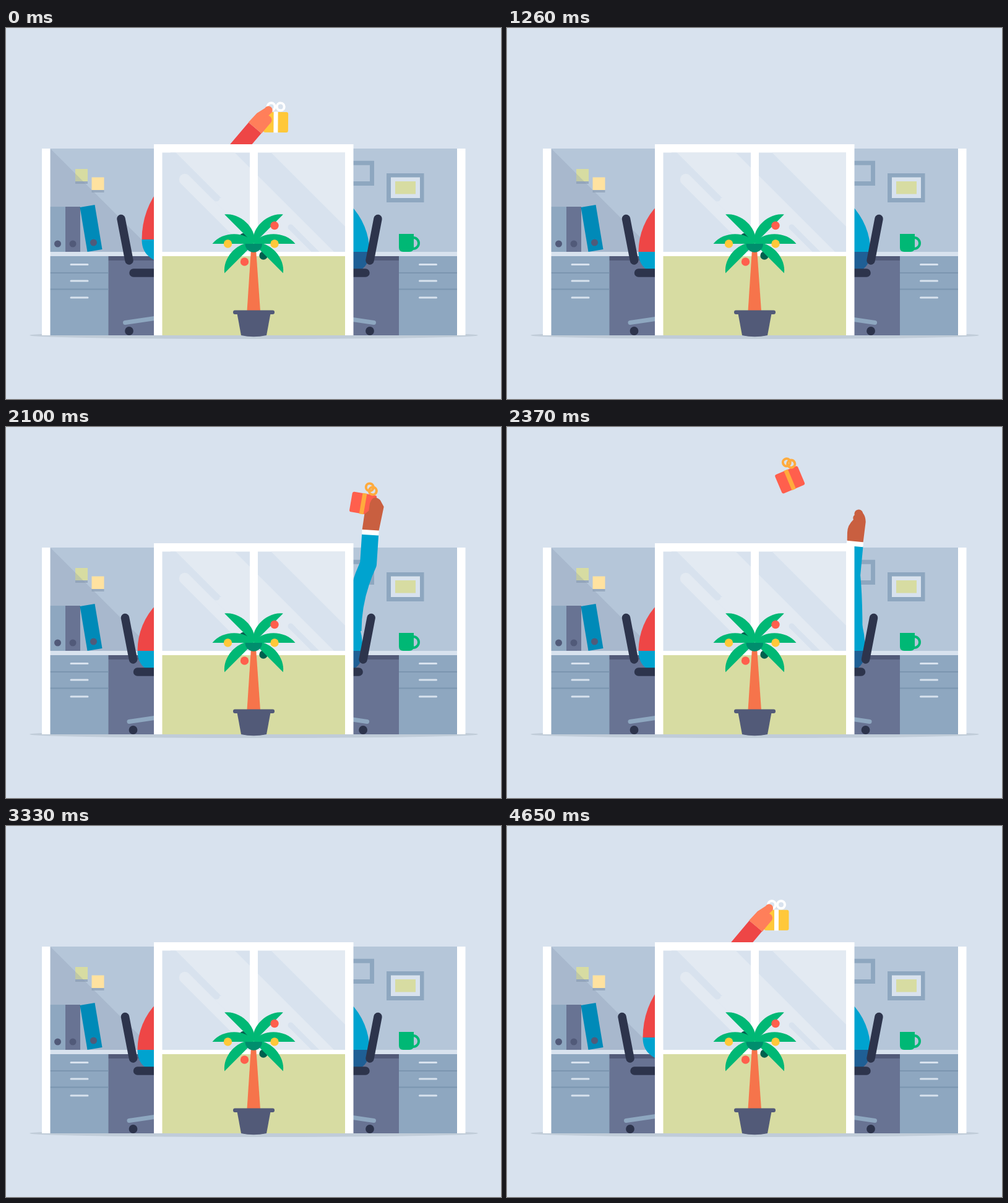
An HTML page that plays this animation: 800x600 px, repeating every 4.68 s.

```html
<!DOCTYPE html>
<html lang="en">
<head>
<meta charset="utf-8">
<title>Office gift exchange</title>
<style>
  html, body { margin: 0; width: 100%; height: 100%; overflow: hidden; background: #d8e2ee; }
  svg { display: block; width: 100vw; height: 100vh; }
</style>
</head>
<body>
<svg viewBox="0 0 800 600">
  <defs>
    <g id="desk">
      <path fill="#687393" d="M165 369h76v128h-76z"/>
      <path fill="#525a78" d="M165 369h76v7h-76z"/>
      <path fill="#d8e2ee" d="M71 362h170v7h-170z"/>
      <path fill="#8ea7c0" d="M71 369h94.500v128h-94.500z"/>
      <path stroke="#7b95b0" stroke-width="2" d="M71 396h94.500M71 422.500h94.500"/>
      <path stroke="#d8e2ee" stroke-width="3" stroke-linecap="round" d="M105 382.500h27M105 409h27M105 436h27"/>
      <path fill="#fff" d="M58 195h13.500v302h-13.500z"/>
    </g>
    <g id="chair" fill="none" stroke="#2d344c" stroke-width="13.500" stroke-linecap="round">
      <path d="M192.500 308.500L205.500 376M212.500 396H270"/>
      <path stroke="#8ea7c0" stroke-width="7" d="M199 476.500L250 469"/>
      <circle cx="205.500" cy="490" r="6.900" fill="#2d344c" stroke="none"/>
    </g>
    <path id="torso" d="M212.500 0A108 108 0 0 1 320.500 -108V0z"/>
    <path id="hips" d="M212.500 362C212.500 382 222 392 245 401H290V362z"/>
    <path id="leaf" fill="#00b875" d="M0 0C10 -20 50 -22 67 0z"/>
    <g id="leaves">
      <use href="#leaf" transform="rotate(-45)"/><use href="#leaf"/><use href="#leaf" transform="rotate(45)"/>
    </g>
    <clipPath id="panes"><path d="M252.500 201.500H394V362H252.500zM407 201.500H548V362H407z"/></clipPath>
  </defs>

  <ellipse cx="400.500" cy="497" rx="362.500" ry="6" fill="#c0ccd8"/>

  <!-- cubicles -->
  <path fill="#b5c6d9" d="M71 195H241V497H71zM559 195H730V497H559z"/>
  <path fill="#98aac0" d="M112 248h20v4h-20zM138.500 262h20v4h-20z"/>
  <path fill="#d7dca2" d="M112 228h20v20h-20z"/>
  <path fill="#ffe2a0" d="M138.500 241.500h20v20.500h-20z"/>
  <path fill="#8799b0" opacity=".3" d="M71.500 195L240 363H71.500z"/>
  <path fill="#8ea7c0" d="M71 289h25v73h-25z"/>
  <path fill="#687393" d="M96 289h24v73h-24z"/>
  <path fill="#008ab8" d="M119.500 290L143.500 286L155.500 358L131.500 362z"/>
  <g fill="#515a79">
    <circle cx="83.500" cy="349" r="5.500"/><circle cx="108" cy="349" r="5.500"/><circle cx="141.500" cy="347" r="5.500"/>
  </g>
  <path fill="none" stroke="#8ea7c0" stroke-width="7" d="M550 218.200H591.500V251.500H550"/>
  <path fill="#8ea7c0" d="M615 235h60.500v47h-60.500z"/>
  <path fill="#d8e2ee" d="M622 241.500h47v33.500h-47z"/>
  <path fill="#d7dca2" d="M629 248h33v20.500h-33z"/>
  <use href="#desk"/>
  <use href="#desk" transform="translate(800.500) scale(-1 1)"/>
  <path fill="#00b875" d="M635 333h24v22q0 7 -7 7h-10q-7 0 -7 -7z"/>
  <circle cx="658" cy="348" r="9" fill="none" stroke="#00b875" stroke-width="4"/>

  <!-- people -->
  <g id="leftBody"><use href="#torso" id="leftTorso" fill="#ee4646"/><use href="#hips" fill="#00a3cf"/></g>
  <g id="rightBody"><use href="#torso" id="rightTorso" fill="#00a3cf"/><use href="#hips" fill="#1f5f95"/></g>
  <path id="leftArm" fill="none" stroke="#ee4646" stroke-width="27" stroke-linejoin="round"/>
  <path id="rightArm" fill="none" stroke="#00a3cf" stroke-width="27" stroke-linejoin="round"/>
  <g id="leftGift"></g>
  <g id="rightGift"></g>
  <g id="leftHand" fill="#ff7f5a">
    <path d="M0 -14L20 -13L35 -8.400L38 4L26 4L23 14L0 14z"/>
    <circle cx="36" cy="-2" r="6.500"/><circle cx="23" cy="7" r="7"/>
  </g>
  <g id="rightHand" fill="#c95f40">
    <path fill="#fff" d="M-1 -13.500h8.500v27h-8.500z"/>
    <path id="fist" d="M7 -13.500L32 -11.500L38 -5L50 -4Q60 -1 60 5Q58 12 54 14L46 19L7 13.500z"/>
    <g id="palm">
      <path d="M7 -13L20 -14Q32 -15 42 -6L57 2Q55 12 40 14L7 13z"/>
      <circle cx="45" cy="-1" r="6"/><circle cx="52" cy="1.500" r="7"/>
    </g>
  </g>
  <use href="#chair" id="leftChair"/>
  <use href="#chair" id="rightChair"/>

  <!-- partition -->
  <path fill="#fff" d="M239 188H561.500V497H239z"/>
  <path fill="#d7dca2" d="M252.500 369H548V497H252.500z"/>
  <g clip-path="url(#panes)" stroke-linecap="round">
    <path fill="#d8e2ee" d="M240 190H560V370H240z"/>
    <path fill="#e3eaf2" d="M274 201H369L530 362H435zM428 201H548V321zM332 275H348L440 367H424z"/>
    <path stroke="#e3eaf2" stroke-width="18.500" d="M289 245L420 376"/>
    <path stroke="#d8e2ee" stroke-width="11" d="M270 205L340 275"/>
    <path stroke="#d8e2ee" stroke-width="9" d="M460 322L510 372"/>
  </g>

  <!-- plant -->
  <path fill="#f6744b" d="M396 358H404L411 458H389.500z"/>
  <path fill="#525a78" d="M373.500 462H427.500L421 497Q400 501.500 380 497z"/>
  <rect x="367" y="456.500" width="67" height="6.500" rx="3" fill="#525a78"/>
  <g fill="#00604e"><circle cx="384" cy="338.500" r="6.700"/><circle cx="416" cy="368" r="6.700"/></g>
  <use href="#leaves" transform="translate(400.500 349)"/>
  <use href="#leaves" transform="translate(400.500 349) scale(-1 1)"/>
  <path fill="#008e6d" d="M386.500 349H414A13.700 13.700 0 0 1 386.500 349z"/>
  <g fill="#ff5f4d"><circle cx="434" cy="319.500" r="6.700"/><circle cx="385.500" cy="378" r="6.700"/></g>
  <g fill="#ffc83a"><circle cx="358.500" cy="349" r="6.700"/><circle cx="434" cy="349" r="6.700"/></g>
</svg>
<script>
const LOOP = 4680, GRAVITY = 0.0032, FOREARM = 48;
const $ = id => document.getElementById(id);
const place = (id, transform) => $(id).setAttribute("transform", transform);
const show = (id, on) => $(id).setAttribute("visibility", on ? "inherit" : "hidden");

function drawGift(id, box, ribbon, loops) {
  $(id).innerHTML = `<rect x="-20" y="-16.500" width="40" height="33" rx="3" fill="${box}"/>
    <path fill="${ribbon}" d="M-3.500 -17h7v34h-7z"/>` + loops.map(([x, y]) =>
    `<circle cx="${x}" cy="${y}" r="6" fill="none" stroke="${ribbon}" stroke-width="4"/>`).join("");
}
drawGift("leftGift", "#ffc83a", "#fff", [[-7.5, -25], [7.5, -25]]);
drawGift("rightGift", "#ff5f4d", "#ffab3d", [[6, -28], [12, -23]]);

const smooth = (t, from, to) => {
  const u = Math.min(1, Math.max(0, (t - from) / (to - from)));
  return u * u * (3 - 2 * u);
};
const pulse = (t, [start, peak, end]) => smooth(t, start, peak) - smooth(t, peak, end);

// Smooth path through poses [time, ...values] that never overshoots one.
function poseAt(poses, t) {
  const last = poses.length - 1;
  if (t <= poses[0][0]) return poses[0].slice(1);
  if (t >= poses[last][0]) return poses[last].slice(1);
  const i = poses.findIndex(pose => pose[0] > t) - 1;
  const [a, b] = [poses[i], poses[i + 1]];
  const span = b[0] - a[0], u = (t - a[0]) / span;
  return a.slice(1).map((from, n) => {
    const c = n + 1;
    const slope = j => j < 0 || j >= last ? 0 : (poses[j + 1][c] - poses[j][c]) / (poses[j + 1][0] - poses[j][0]);
    const tangent = j => {
      const p = slope(j - 1), q = slope(j);
      return p * q > 0 ? 2 * p * q / (p + q) : 0;
    };
    return from + (b[c] - from) * u * u * (3 - 2 * u)
      + span * u * (1 - u) * ((1 - u) * tangent(i) - u * tangent(i + 1));
  });
}

// arm: time, wrist x, wrist y, angle. grip: gift offset and turn in the hand.
// flight: speed x, speed y, spin. lean: shifts at the height of the throw.
const left = {
  side: "left", outward: -1, shoulder: [330, 300], grip: [28.8, 19.6, 50],
  arm: [[3690, 332, 275, -100], [4150, 365, 180, -78], [4700, 402.5, 161.5, -49.5],
    [5190, 354, 190, -80], [5320, 335, 270, -95]],
  release: 4720, flight: [0.23, -0.33, 0.05],
  recoil: [2700, 2830, 3330], throwing: [3690, 4660, 5770], reaching: [3690, 4660, 5770],
  lean: { chair: -6.5, x: 7, y: -20, stretch: 0.13 }
};
const right = {
  side: "right", outward: 1, shoulder: [561, 330], grip: [48.8, -14.8, 96],
  arm: [[1560, 535, 300, -90], [1880, 643, 195, -20], [2000, 617, 150, -60], [2100, 589, 173.5, -86],
    [2220, 547, 185, -115], [2640, 598, 206, -12], [2780, 500, 300, -30]],
  release: 2130, flight: [-0.42, -0.57, -0.1],
  recoil: [370, 560, 1290], throwing: [1900, 2180, 2640], reaching: [1560, 2600, 3240],
  lean: { chair: -13.5, x: -13.5, y: 0, stretch: 0.33 }
};

function heldGift({ arm, grip: [gx, gy, turn] }, t) {
  const [x, y, angle] = poseAt(arm, t), a = angle * Math.PI / 180;
  return [x + gx * Math.cos(a) - gy * Math.sin(a), y + gx * Math.sin(a) + gy * Math.cos(a), angle + turn];
}

function drawPerson(person, t) {
  const { side, outward, shoulder, arm, release, flight, lean } = person;
  const mirror = outward > 0 ? "translate(800) scale(-1 1)" : "";
  const recoil = pulse(t, person.recoil), effort = pulse(t, person.throwing);
  const chairX = outward * 12 * recoil + lean.chair * effort - (mirror ? 6.5 : 0);
  const bodyX = outward * 7 * recoil + lean.x * effort;
  place(side + "Chair", `translate(${chairX}) ${mirror}`);
  place(side + "Body", `translate(${bodyX} ${lean.y * effort - 5 * recoil}) ${mirror}`);
  place(side + "Torso", `translate(0 362) scale(1 ${1 + lean.stretch * pulse(t, person.reaching)})`);

  const [x, y, angle] = poseAt(arm, t), a = angle * Math.PI / 180;
  const elbow = [x - FOREARM * Math.cos(a), y - FOREARM * Math.sin(a)];
  $(side + "Arm").setAttribute("d", `M${shoulder}Q${shoulder[0]} ${shoulder[1] - 55} ${elbow}L${x} ${y}`);
  place(side + "Hand", `translate(${x} ${y}) rotate(${angle})`);
  const active = t > arm[0][0] && t < arm[arm.length - 1][0];
  for (const part of ["Arm", "Hand", "Gift"]) show(side + part, active);

  const air = Math.max(0, t - release);
  const [gx, gy, turn] = heldGift(person, Math.min(t, release));
  const [vx, vy, spin] = flight;
  place(side + "Gift", `translate(${gx + vx * air} ${gy + vy * air + GRAVITY / 2 * air * air}) rotate(${turn + spin * air})`);
}

function frame() {
  const t = performance.now() % LOOP;
  drawPerson(left, t < 2000 ? t + LOOP : t);
  drawPerson(right, t);
  $("fist").style.display = t < right.release ? "" : "none";
  $("palm").style.display = t < right.release ? "none" : "";
  requestAnimationFrame(frame);
}
frame();
</script>
</body>
</html>
```
